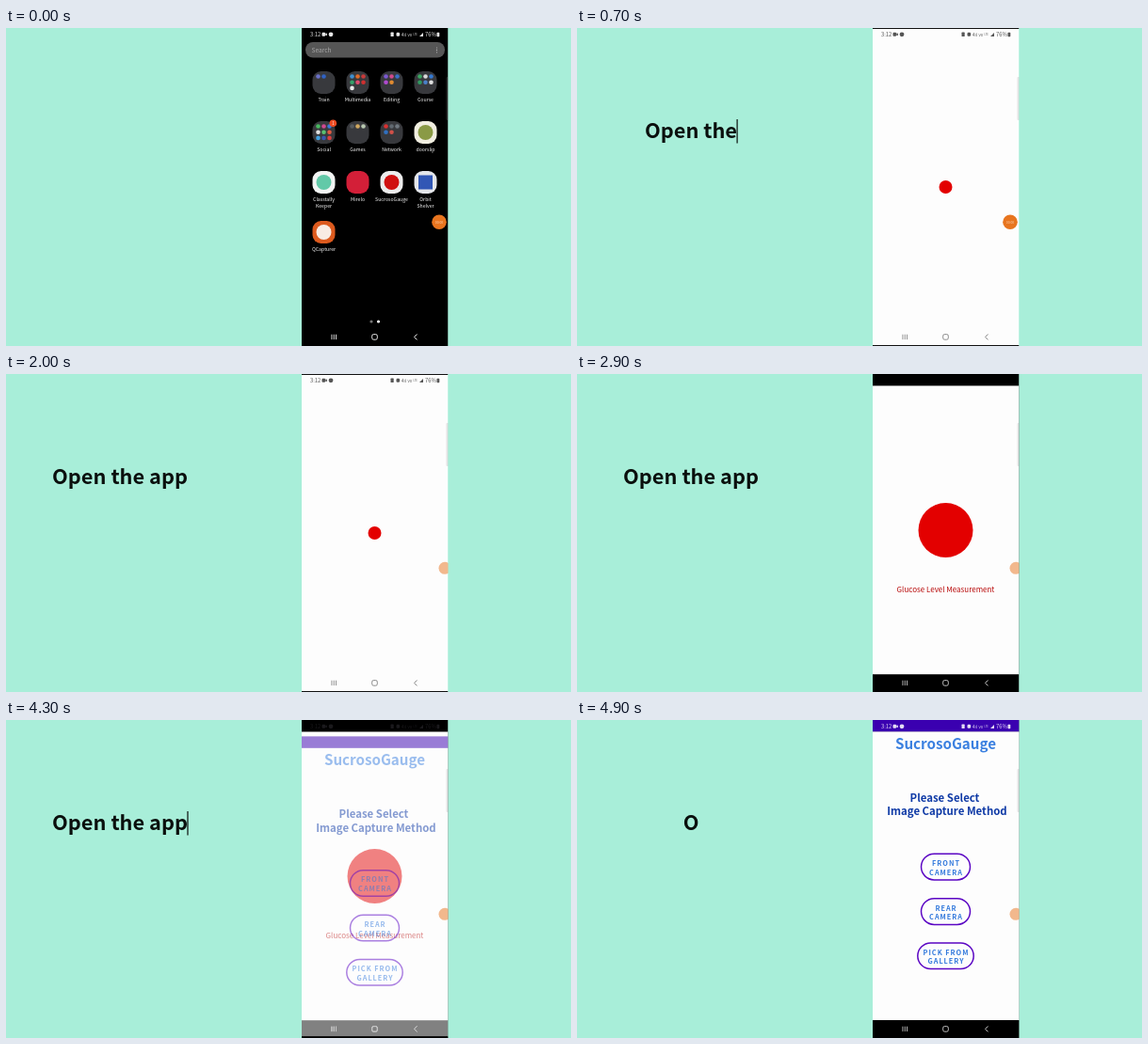
Recreate the animation shown at these times as an HTML page with a canvas. Size 600 px wide and 338 px high, loop 5000 ms.

```html
<!DOCTYPE html>
<html lang="en">
<head>
<meta charset="utf-8">
<title>Open the app</title>
<style>
html, body { margin: 0; width: 100%; height: 100%; overflow: hidden; background: #a8eed9; }
canvas { display: block; }
</style>
</head>
<body>
<canvas id="stage" width="600" height="338"></canvas>
<script>
const c = document.getElementById('stage').getContext('2d');
const FONT = '"Noto Sans CJK JP", "Noto Sans CJK SC", "Noto Sans", sans-serif';
const LOOP = 5000, LEFT = 314, WIDTH = 155.5, MID = 391.5, RED = '#e30000';
const APP = 'SucrosoGauge', MESSAGE = 'Open the app';
const COLS = [337.5, 373.5, 409.5, 445.5], ROWS = [58, 111, 164, 217];

// label, colours of the small icons inside
const FOLDERS = [
  ['Train', '#6a70c8 #2f62c4'],
  ['Multimedia', '#3f8fd0 #e06a28 #c83a3a #35a06a #e04a70 #d03030 #e8e8e8'],
  ['Editing', '#7a58d0 #d04a8a #3a70c8 #b04ad0 #e08a30'],
  ['Course', '#3aa860 #d8d8d8 #3478d0 #2f9a60 #4a80c8 #e0e0e0'],
  ['Social', '#48b860 #d04890 #3a78d8 #e0e0e0 #58c070 #e05a40 #40a0e0 #3858b0 #d84040'],
  ['Games', '#555b60 #d0a860 #b8c8b0'],
  ['Network', '#d83030 #606870 #707880 #3070c0 #d05048']
];
// label lines, tile, mark, mark shape
const APPS = [
  [['doorslip'], '#f1eee0', '#8a9a45', 'dot'],
  [['Classtally', 'Keeper'], '#f2f4f3', '#62c9a8', 'dot'],
  [['Mirelo'], '#d31f38'],
  [[APP], '#ececec', '#d01010', 'dot'],
  [['Orbit', 'Shelver'], '#e4e6ea', '#3157b5', 'box'],
  [['QCapturer'], '#dc5a1e', '#f8ece4', 'dot']
];

const clamp = v => Math.max(0, Math.min(1, v));
const mix = (a, b, k) => a + (b - a) * k;
const out = k => 1 - (1 - k) ** 3;

function rect(x, y, w, h, color) {
  c.fillStyle = color;
  c.fillRect(x, y, w, h);
}
function round(x, y, w, h, r, color) {
  c.fillStyle = color;
  c.beginPath();
  c.roundRect(x, y, w, h, r);
  c.fill();
}
function dot(x, y, r, color) {
  c.fillStyle = color;
  c.beginPath();
  c.arc(x, y, r, 0, 7);
  c.fill();
}
function text(s, x, y, size, color, weight = 400, align = 'center', spacing = 0) {
  c.font = `${weight} ${size}px ${FONT}`;
  c.textAlign = align;
  c.letterSpacing = spacing + 'px';
  c.fillStyle = color;
  c.fillText(s, x, y);
}

function status(color) {
  text('3:12', 323, 9, 5.8, color, 400, 'left');
  round(335.5, 4.8, 3.6, 4, 1, color);
  rect(339.3, 5.6, 1.6, 2.4, color);
  dot(345, 6.8, 2.4, color);
  round(408.5, 4.6, 3.2, 4.4, .6, color);
  round(414.5, 4.8, 3.6, 4, 1.2, color);
  text('4ıl', 420, 9, 4.5, color, 400, 'left');
  text('Vo', 426.5, 9, 4, color, 400, 'left');
  text('LTE', 432.5, 8, 2.8, color, 400, 'left');
  c.beginPath();
  c.moveTo(439, 9);
  c.lineTo(443, 9);
  c.lineTo(443, 5);
  c.fill();
  text('76%', 445, 9, 5.8, color, 400, 'left');
  round(457.5, 4.8, 2.8, 4.4, .6, color);
}

function nav(color) {
  for (const x of [345.5, 347.8, 350.1]) rect(x, 325.7, .9, 5.4, color);
  c.strokeStyle = color;
  c.lineWidth = 1;
  c.beginPath();
  c.roundRect(388.7, 325.6, 5.6, 5.6, 1.7);
  c.moveTo(436.4, 325.4);
  c.lineTo(433.6, 328.4);
  c.lineTo(436.4, 331.4);
  c.stroke();
}

function cell(i, tile, lines) {
  const x = COLS[i % 4], y = ROWS[i >> 2];
  round(x - 12, y - 12, 24, 24, 9, tile);
  lines.forEach((s, j) => text(s, x, y + 20.2 + j * 6.3, 5.2, '#f4f4f4'));
  return [x, y];
}

function home() {
  rect(LEFT, 0, WIDTH, 338, '#000');
  round(318, 15, 148, 16.5, 8, '#565656');
  text('Search', 324.5, 25.8, 6.6, '#a8a8a8', 400, 'left');
  for (const y of [21, 23.4, 25.8]) dot(457.5, y, .6, '#bbb');
  FOLDERS.forEach(([name, minis], i) => {
    const [x, y] = cell(i, '#38393d', [name]);
    minis.split(' ').forEach((m, j) => dot(x - 6 + j % 3 * 6, y - 6.5 + (j / 3 | 0) * 6.2, 2.3, m));
  });
  dot(347.3, 101.3, 3.8, '#ee4b22');
  text('1', 347.3, 103, 4.2, '#fff');
  APPS.forEach(([lines, tile, mark, shape], i) => {
    const [x, y] = cell(i + 7, tile, lines);
    if (shape === 'dot') dot(x, y, 8, mark);
    if (shape === 'box') rect(x - 7.5, y - 7.5, 15, 15, mark);
  });
  dot(388, 312, 1.6, '#777');
  dot(395.5, 312, 1.6, '#fff');
  status('#e6e6e6');
  nav('#eee');
}

function launch(k) {
  const x = mix(397.5, LEFT, k), y = mix(152, 0, k);
  round(x, y, mix(24, WIDTH, k), mix(24, 338, k), 9 * (1 - k), '#fdfdfd');
  dot(mix(409.5, MID, k), mix(164, 169, k), mix(5, 7, k), RED);
  if (k < .85) return;
  rect(LEFT, 0, WIDTH, 1, '#111');
  rect(LEFT, 337, WIDTH, 1, '#111');
  status('#555');
  nav('#888');
}

function splash() {
  rect(LEFT, 0, WIDTH, 338, '#000');
  rect(LEFT, 12.5, WIDTH, 306.7, '#fdfdfd');
  dot(MID, 166, 29, RED);
  text('Glucose Level Measurement', MID, 231.8, 8, '#b80808');
  nav('#c4c4c4');
}

function button(y, half, lines) {
  c.strokeStyle = '#5b06c4';
  c.lineWidth = 1.5;
  c.beginPath();
  c.roundRect(MID - half, y, half * 2, 27.6, 13.8);
  c.stroke();
  lines.forEach((s, i) => text(s, MID + .5, y + 12.8 + i * 9.6, 7.3, '#3178dc', 700, 'center', 1));
}

function menu(t) {
  const shift = 24 * (1 - clamp((t - 4250) / 500)) ** 3;
  c.save();
  c.globalAlpha = clamp((t - 4250) / 100);
  c.translate(0, shift);
  rect(LEFT, 0, WIDTH, 12.5, '#3a00b0');
  rect(LEFT, 12.5, WIDTH, 306.5, '#fdfdfd');
  text(APP, MID, 31, 15.2, '#3b80e0', 700);
  text('Please Select', 390.5, 86.5, 11.4, '#0f3aa6', 700);
  text('Image Capture Method', 393, 101.2, 11.4, '#0f3aa6', 700);
  button(142.3, 26, ['FRONT', 'CAMERA']);
  button(189.8, 26, ['REAR', 'CAMERA']);
  button(237, 29.7, ['PICK FROM', 'GALLERY']);
  c.restore();
  c.globalAlpha = clamp((t - 4250) / 450);
  status('#e4dcf4');
  c.globalAlpha = 1;
  rect(LEFT, 319 + shift, WIDTH, 19, '#000');
  nav('#c4c4c4');
}

function bubble(t) {
  const k = out(clamp((t - 1450) / 250));
  const x = mix(460, 466, k);
  c.globalAlpha = mix(1, .5, k);
  dot(x, 206.3, mix(7.8, 6.5, k), '#e8751f');
  if (k < .5) text('00:0' + Math.floor(t / 1000), x, 207.6, 3.4, '#fbd9bd');
  c.globalAlpha = 1;
}

function typing(t) {
  const n = Math.min(MESSAGE.length, Math.floor(t / 87), Math.ceil((4930 - t) / 34));
  const s = MESSAGE.slice(0, Math.max(0, n));
  text(s, 121, 116.9, 21.75, '#0a0f0d', 700);
  const w = c.measureText(s).width, blink = t % 1000;
  if (blink >= 300 && blink < 800 && t < 4800) rect(121 + w / 2 - .5, 97, 1.2, 25.5, '#0a0f0d');
}

function draw(now) {
  const t = now % LOOP;
  rect(0, 0, 600, 338, '#a8eed9');
  c.save();
  c.beginPath();
  c.rect(LEFT, 0, WIDTH, 338);
  c.clip();
  if (t < 2650) {
    if (t < 500) home();
    if (t > 150) launch(out(clamp((t - 150) / 330)));
  } else {
    splash();
    if (t > 4250) menu(t);
  }
  round(467.5, 52, 3, 46, 1, 'rgba(150,150,155,.25)');
  bubble(t);
  c.restore();
  typing(t);
}

function tick(now) {
  draw(now);
  requestAnimationFrame(tick);
}
draw(0);
requestAnimationFrame(tick);
</script>
</body>
</html>
```
